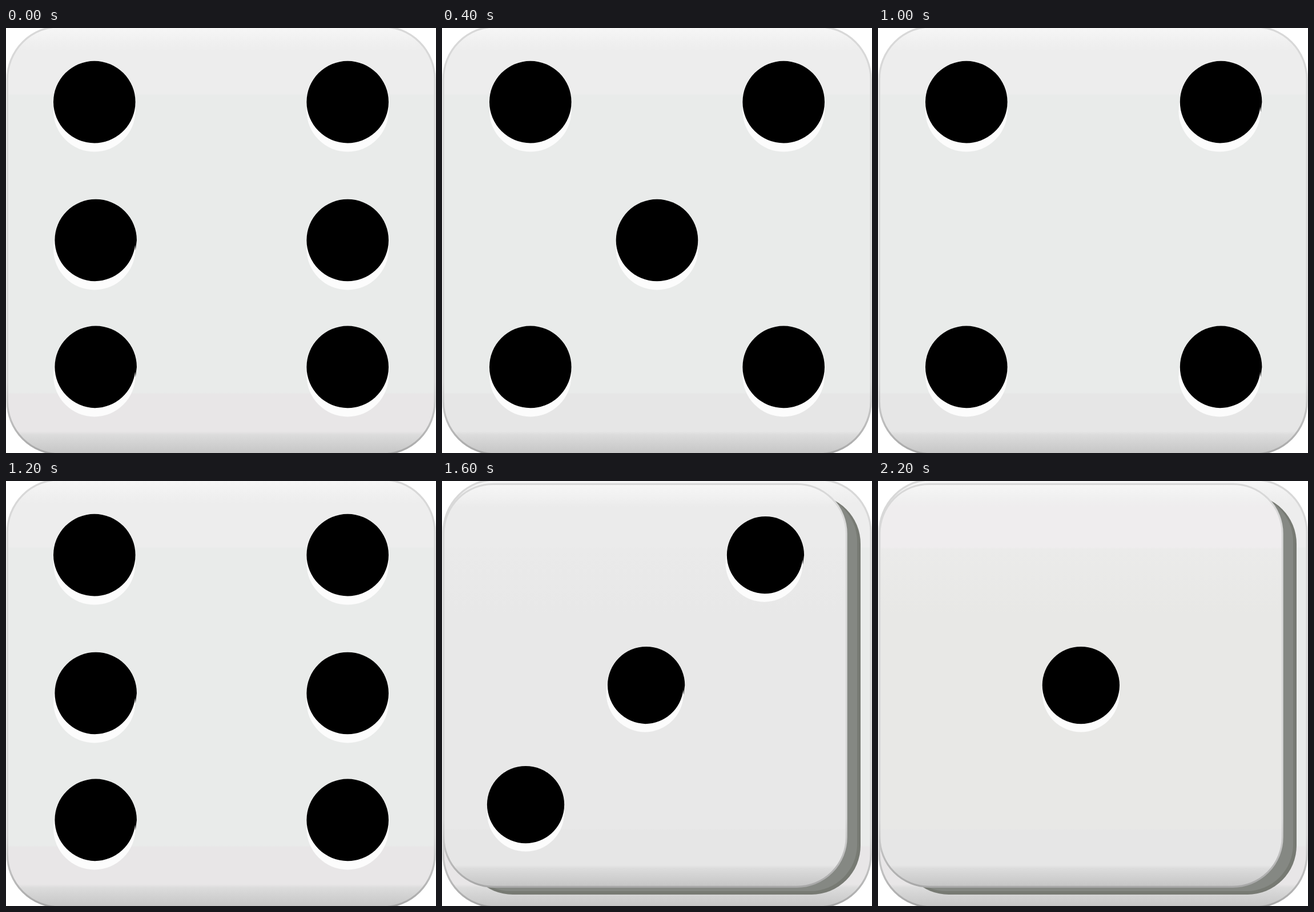
An HTML page that plays this animation: 753 px wide and 744 px high, repeating every 2.4 s.

```html
<!DOCTYPE html>
<html lang="en">
<head>
<meta charset="utf-8">
<title>Rolling die</title>
<style>
  html, body { margin: 0; width: 100%; height: 100%; overflow: hidden; background: #fff; }
  svg { display: block; width: 100vw; height: 100vh; }
</style>
</head>
<body>
<svg id="stage" viewBox="0 0 753 744" preserveAspectRatio="none"></svg>
<script>
const STEP = 200;
const ROLLS = [6, 3, 5, 2, 1, 4, 6, 2, 3, 5, 4, 1];

const RADIUS = 71.8, DROP = 15.2, SLIP = 2.4;
const COLUMN = { l: 154.8, m: 376.5, r: 598.2 };
const ROW = { t: 129.6, c: 371.5, b: 593.4 };

// Pips name a row and a column; "+" marks one that sits slightly to the right.
// Tones run from the top of the panel to the bottom.
const FACES = {
  1: { pips: 'cm', tones: ['#efedee', '#ebebea', '#e8e8e6', '#e6e6e6'] },
  2: { pips: 'tr bl+', tones: ['#edebec', '#eae9e9', '#e8e8e8', '#e6e6e6'] },
  3: { pips: 'tr+ cm+ bl', tones: ['#ebebeb', '#eaeaea', '#e8e8e8', '#e6e6e6'] },
  4: { pips: 'tl tr+ bl br+', tones: ['#ededed', '#e9ebea', '#e9ebea', '#e6e6e6'] },
  5: { pips: 'tl tr cm bl br', tones: ['#ededed', '#e9ebea', '#e9ebea', '#e6e6e6'] },
  6: { pips: 'tl tr cl+ cr bl+ br', tones: ['#ededed', '#e9ebea', '#e9ebea', '#e8e6e7'] }
};

const gradient = (id, stops) =>
  `<linearGradient id="${id}" gradientUnits="userSpaceOnUse" x1="0" x2="0" y1="0" y2="744">` +
  stops.map(([y, color]) => `<stop offset="${y / 744}" stop-color="${color}"/>`).join('') +
  '</linearGradient>';

const panelFill = (n, [top, upper, middle, low]) => gradient('fill' + n, [
  [0, '#f6f6f6'], [24, '#f0f0f0'], [40, top], [115, top], [118, upper],
  [238, middle], [638, middle], [641, low], [706, low], [712, '#dcdcdc'], [744, '#c6c6c6']]);

const box = (x, y, w, h, r, attrs) =>
  `<rect x="${x}" y="${y}" width="${w}" height="${h}" rx="${r}" ${attrs}/>`;

const panel = n =>
  box(2.4, -2.4, 748.6, 748.4, 92, `fill="url(#fill${n})" stroke="url(#edge)" stroke-width="3.3"`);

const shadow =
  box(38, 24, 695, 700, 86, 'fill="#777a73"') +
  box(38, 24, 689, 694, 82, 'fill="#858883"');

function pip([row, column, slipped]) {
  const x = COLUMN[column], y = ROW[row], r = RADIUS;
  const slip = slipped ? SLIP : 0;
  const edge = dy => x + Math.sqrt(r * r - dy * dy);
  const arc = (px, py) => `A${r} ${r} 0 0 0 ${px} ${py}`;
  // A slipped pip keeps its lower right side and leaves a small spur there.
  const d = `M${x + slip + r} ${y}` + arc(x + slip - r, y) + arc(x + slip / 3, y + r) +
    arc(edge(8), y + 8) +
    (slip ? `L${edge(18) + slip} ${y + 18}` : '') + 'Z';
  return `<circle cx="${x}" cy="${y + DROP}" r="${r}" fill="#fcfcfc"/><path d="${d}"/>`;
}

// Low faces are the same panel, smaller, lying on a full-size one.
function face(n) {
  const art = panel(n) + FACES[n].pips.split(' ').map(pip).join('');
  const small = `${panel(6)}${shadow}<g transform="translate(.7 7.6) scale(.942)">${art}</g>`;
  return `<g id="face${n}" display="none">${n > 3 ? art : small}</g>`;
}

const numbers = Object.keys(FACES);
const stage = document.getElementById('stage');
stage.innerHTML = '<defs>' +
  numbers.map(n => panelFill(n, FACES[n].tones)).join('') +
  gradient('edge', [[0, '#d8d8d8'], [620, '#d8d8d8'], [744, '#a8a8a8']]) +
  '</defs>' + numbers.map(face).join('');

const groups = numbers.map(n => document.getElementById('face' + n));
const start = performance.now();

function tick(now) {
  const step = Math.floor(Math.max(0, now - start) / STEP);
  const roll = ROLLS[step % ROLLS.length];
  groups.forEach((group, i) => group.setAttribute('display', i + 1 === roll ? 'inline' : 'none'));
  requestAnimationFrame(tick);
}
tick(start);
</script>
</body>
</html>
```
